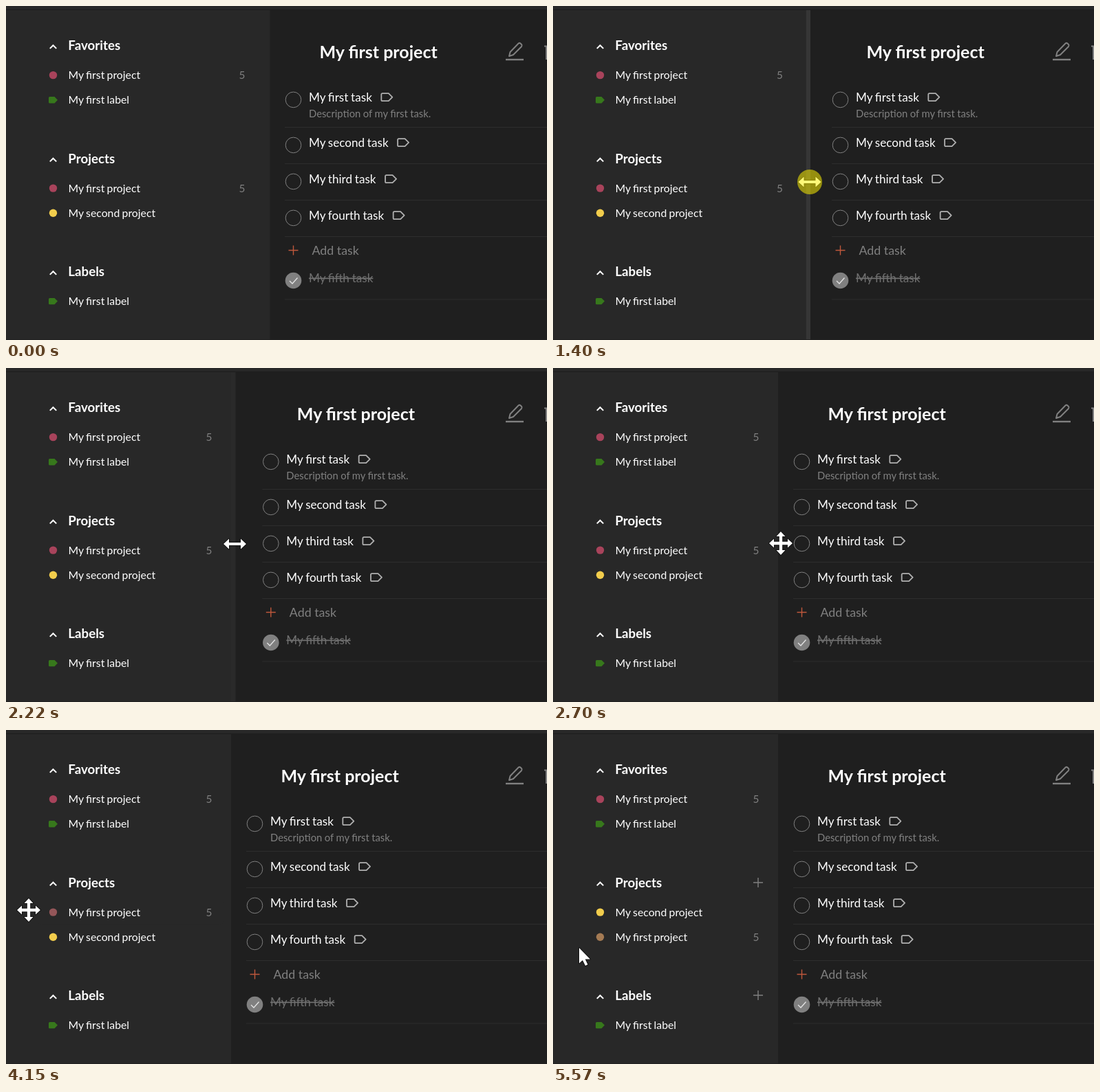
These frames come from a looping animation (786x486 px, 5.64 s). An HTML page:

```html
<!DOCTYPE html>
<html lang="en">
<head>
<meta charset="utf-8">
<title>Task list</title>
<style>
  html, body { margin: 0; width: 100%; height: 100%; overflow: hidden; background: #282828; }
  svg { display: block; width: 100vw; height: 100vh; font: 15.8px Lato, sans-serif; word-spacing: -.8px; fill: #fff; }
  .heading { font-size: 18.75px; font-weight: 700; }
  .title { font-size: 25px; font-weight: 700; word-spacing: 0; }
  .task, .done { font-size: 17.1px; word-spacing: -.6px; }
  .note { font-size: 14.8px; word-spacing: -.3px; fill: #808080; }
  .count { font-size: 15.3px; fill: #808080; }
  .add { font-size: 17.8px; word-spacing: 0; fill: #808080; }
  .done { fill: #707070; text-decoration: line-through; }
  .line { fill: none; stroke: #808080; }
  .rule { fill: none; stroke: #2d2d2d; }
  .grey { fill: #808080; }
  .red { fill: #a8435b; }
  .yellow { fill: #f2cd4c; }
  .green { fill: #37781c; }
  .pointer { stroke: #111; stroke-width: 2; stroke-linejoin: round; paint-order: stroke; }
  #shadow { fill: #292929; filter: drop-shadow(0 3px 4px rgba(0, 0, 0, .4)); }
</style>
</head>
<body>
<svg viewBox="0 0 786 486">
  <defs>
    <path id="chevron" d="M-4.7 2.4L0-2.3 4.7 2.4" fill="none" stroke="#fff" stroke-width="2"/>
    <path id="tag" d="M2-5.5H11L16.5 0 11 5.5H2Q.5 5.5.5 4V-4Q.5-5.5 2-5.5z" fill="none" stroke="#b0b0b0" stroke-width="1.8" stroke-linejoin="round"/>
    <path id="label" d="M1.5-4.7H8.5L13 0 8.5 4.7H1.5Q0 4.7 0 3.2V-3.2Q0-4.7 1.5-4.7z"/>
    <circle id="dot" cx="6.5" r="5.7"/>
    <path id="plus" d="M-7 0H7M0-7V7" fill="none" stroke-width="1.4"/>
    <rect id="panel" x="46" y="-18" width="270" height="35.5" rx="5"/>
  </defs>

  <g id="edge">
    <rect width="800" height="486" fill="#1f1f1f"/>
    <rect id="bar" width="6.5" height="486" fill="#363636"/>
  </g>

  <g id="content">
    <text class="title" x="455.5" y="76">My first project</text>
    <text class="note" x="440" y="162">Description of my first task.</text>
    <g id="tasks"></g>
    <use href="#plus" x="417.5" y="355.5" stroke="#c0583c"/>
    <text class="add" x="444.5" y="362">Add task</text>
    <circle class="grey" cx="417.5" cy="399.5" r="11.8"/>
    <path d="M412 400l4 4 7.5-8.5" fill="none" stroke="#e4e4e4" stroke-width="1.3"/>
    <text class="done" x="440" y="402">My fifth task</text>
    <path class="rule" d="M405 427H860"/>
  </g>

  <g class="line" stroke-width="2">
    <path d="M726 78H752" stroke-width="2.4"/>
    <path d="M731 73l1.5-6 12-12.5q1.5-1.3 3 0l1.5 1.5q1.3 1.5 0 3l-12 12z" stroke-linejoin="round"/>
    <path d="M782 58.5h8M785 59V78"/>
  </g>

  <rect width="786" height="5" fill="#282828"/>
  <path d="M0 5.5H786" fill="none" stroke="#1d1d1d"/>
  <path d="M0 485.5H786" fill="none" stroke="#222"/>

  <g id="hover"><use href="#panel" y="265" fill="#333"/></g>
  <use id="slot" href="#panel" fill="#303030"/>
  <g id="sidebar"><use id="shadow" href="#panel"/></g>
  <g id="pluses" class="line">
    <use href="#plus" x="298" y="222"/>
    <use href="#plus" x="298" y="386"/>
  </g>

  <g id="cursor">
    <path class="pointer" id="arrow" d="M0 0V22.5L5 18 9 26 12.5 24.3 8.8 16.5H16z"/>
    <path class="pointer" id="resize" d="M-16.5 0l8-7.5v5.5h17v-5.5l8 7.5-8 7.5v-5.5h-17v5.5z"/>
    <path class="pointer" id="move" d="M0-17l6.5 7h-4.3v7.8h7.8v-4.3l7 6.5-7 6.5v-4.3h-7.8v7.8h4.3l-6.5 7-6.5-7h4.3v-7.8h-7.8v4.3l-7-6.5 7-6.5v4.3h7.8v-7.8h-4.3z"/>
    <path class="pointer" id="hand" d="M-2.6 2.5a2.6 2.6 0 0 1 5.2 0V10q2-1.5 4.2 1 2-1 4 1 4-1 4 3V22q0 4-3 6.5V31H0V28.5L-7.5 19q-1-3 1.5-3 2 0 3.4 3z"/>
    <circle id="press" r="18" fill="#fff200" fill-opacity=".53"/>
  </g>
</svg>
<script>
  const LOOP = 5640, ROW = 36.2, SECTION = 164.5;
  const $ = id => document.getElementById(id);
  const add = (id, markup) => $(id).insertAdjacentHTML('beforeend', markup);

  // Task list
  ['first', 'second', 'third', 'fourth'].forEach((name, i) => {
    const y = i ? 146 + 53 * i : 133;
    add('tasks', `
      <circle class="line" cx="417.5" cy="${y + 3.4}" r="11.3"/>
      <text class="task" x="440" y="${y + 6}">My ${name} task</text>
      <path class="rule" d="M405 ${176.5 + 53 * i}H860"/>`);
    const width = $('tasks').querySelector('text:last-of-type').getComputedTextLength();
    add('tasks', `<use href="#tag" x="${440 + width + 13}" y="${y - .3}"/>`);
  });

  // Sidebar
  const project = (name, color, count = '') => ({ name: `My ${name} project`, icon: 'dot', color, count });
  const label = { name: 'My first label', icon: 'label', color: 'green', count: '' };
  const sections = {
    Favorites: [project('first', 'red', 5), label],
    Projects: [project('first', 'red', 5), project('second', 'yellow')],
    Labels: [label]
  };
  Object.entries(sections).forEach(([title, rows], i) => {
    const y = 57.3 + SECTION * i;
    add('sidebar', `
      <use href="#chevron" x="68.5" y="${y + 2.2}"/>
      <text class="heading" x="90.3" y="${y + 6.7}">${title}</text>`);
    rows.forEach(({ name, icon, color, count }, j) => add('sidebar', `
      <g class="row" transform="translate(0 ${y + 43.3 + ROW * j})">
        <use href="#${icon}" class="${color}" x="62"/>
        <text x="90.6" y="5.5">${name}</text>
        <text class="count" y="5.5">${count}</text>
      </g>`));
  });
  const counts = document.querySelectorAll('.count');
  const [, , first, second] = document.querySelectorAll('.row');
  const firstDot = first.querySelector('use');
  $('sidebar').append($('shadow'), first);

  // Grip and menu dots of the hovered row
  for (let i = 0; i < 9; i++) {
    const grip = i < 6;
    const x = grip ? 32 + 5.7 * (i % 2) : 282.5 + 6.5 * (i - 6);
    const y = grip ? 259 + 6 * (i >> 1) : 265;
    add('hover', `<circle class="grey" cx="${x}" cy="${y}" r="${grip ? 1.7 : 2}"/>`);
  }

  const ramp = (t, from, to) => Math.min(1, Math.max(0, (t - from) / (to - from)));
  const within = (t, from, to) => t >= from && t < to;
  const easeOut = p => 1 - (1 - p) ** 3;
  const smooth = p => p * p * (3 - 2 * p);
  const mix = (a, b, p) => a + (b - a) * p;
  const place = (el, x, y) => el.setAttribute('transform', `translate(${x} ${y})`);
  const fade = (el, opacity) => { el.style.opacity = Number(opacity); };

  function pointerAt(t, edge, drag) {
    if (t < 920) {
      const p = smooth(ramp(t, 290, 840));
      return ['arrow', mix(467, 383, p), mix(455, 245, p)];
    }
    if (t < 2700) return ['resize', Math.min(383.5, edge + 5.5), 256];
    if (t >= 5570) return ['arrow', 38, 317];
    const toRow = easeOut(ramp(t, 2700, 3450)), toGrip = ramp(t, 3450, 3850);
    const kind = within(t, 2780, 3700) ? 'hand' : 'move';
    return [kind, 332 - 260 * toRow - 39 * toGrip, 255 + 16 * toRow - 9 * toGrip + 34 * drag];
  }

  function draw(t) {
    // Resizing
    const resize = ramp(t, 1180, 1960);
    const edge = mix(383.5, 327, resize);
    place($('edge'), edge, 5);
    fade($('bar'), ramp(t, 720, 840) - ramp(t, 2140, 2300));
    place($('content'), -56 * easeOut(ramp(t, 2140, 2460)), 0);
    counts.forEach(el => el.setAttribute('x', 338.5 - 48 * resize));

    // Reordering
    const hovered = within(t, 2860, 4150);
    const drag = ramp(t, 4180, 4690), drop = easeOut(ramp(t, 4770, 4930));
    const lift = ramp(t, 4150, 4230) - drop;
    const swap = smooth(ramp(t, 4450, 4610));
    const firstY = 265.1 + 28.5 * drag + (ROW - 28.5) * drop;
    place(first, 0, firstY);
    place(second, 0, 265.1 + ROW * (1 - swap));
    place($('shadow'), 0, firstY);
    place($('slot'), 0, 265.1 + (swap > 0 ? ROW : 0));
    fade($('shadow'), lift);
    fade($('slot'), lift);
    fade($('hover'), hovered);
    fade(first.querySelector('.count'), !hovered);
    fade($('pluses'), within(t, 2780, 4150) || t >= 4930);
    firstDot.style.fill = drop ? '#a47a53' : lift ? '#945659' : '';

    // Pointer
    const [kind, x, y] = pointerAt(t, edge, drag);
    place($('cursor'), x, y);
    fade($('cursor'), t >= 290);
    document.querySelectorAll('.pointer').forEach(el => fade(el, el.id === kind));
    fade($('press'), within(t, 1160, 2140));
  }

  const start = performance.now();
  function tick(now) {
    draw(Math.max(0, now - start) % LOOP);
    requestAnimationFrame(tick);
  }
  tick(start);
</script>
</body>
</html>
```
